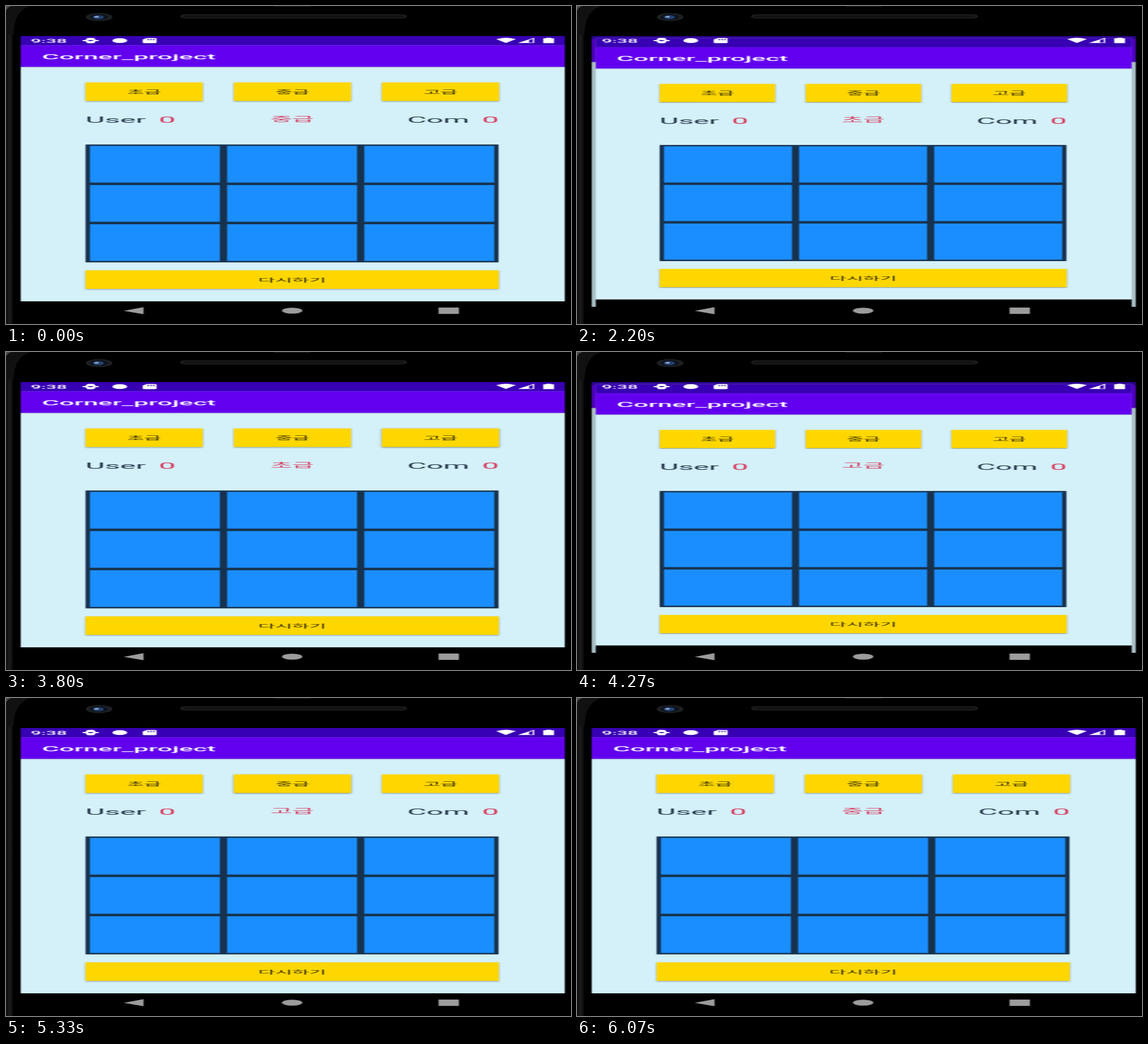
Write an HTML page that moves like this. It is 998 px wide and 561 px high and loops after 6.14 s.

```html
<!DOCTYPE html>
<html lang="ko">
<head>
<meta charset="utf-8">
<title>Board game</title>
<style>
  html, body { margin: 0; width: 100%; height: 100%; overflow: hidden; background: #000; }
  svg { display: block; width: 998px; height: 561px; }
  text { font-family: Roboto, "Noto Sans CJK KR", "Noto Sans CJK", sans-serif; }
  .ko { font-family: "Noto Sans CJK KR", "Noto Sans CJK", sans-serif; }
</style>
</head>
<body>
<svg viewBox="0 0 998 561">
  <defs>
    <linearGradient id="rim">
      <stop offset="0" stop-color="#0c0c0c"/>
      <stop offset=".45" stop-color="#1c1c1c"/>
      <stop offset=".75" stop-color="#121212"/>
      <stop offset="1" stop-color="#020202"/>
    </linearGradient>
    <clipPath id="glass"><rect x="26" y="53" width="961" height="500"/></clipPath>
    <filter id="soft" filterUnits="userSpaceOnUse" x="0" y="40" width="998" height="521" color-interpolation-filters="sRGB">
      <feGaussianBlur stdDeviation=".9 .25"/>
    </filter>
    <filter id="rest" x="-10%" y="-30%" width="120%" height="160%"><feGaussianBlur stdDeviation="2 .8"/></filter>
    <filter id="lift" x="-10%" y="-30%" width="120%" height="160%"><feGaussianBlur stdDeviation="4.5 1"/></filter>
  </defs>

  <!-- phone body -->
  <rect width="998" height="561"/>
  <rect y="30" width="13" height="531" fill="url(#rim)"/>
  <path d="M0 0H44Q14 8 13 50H0Z" fill="#111"/>
  <path d="M0 0H10Q2 2 0 9Z" fill="#4a4a4a"/>
  <rect x="474" y="0" width="64" height="1.5" fill="#161616"/>
  <rect x="307.500" y="14.500" width="401" height="7.500" rx="9" ry="3.700" fill="#1b1b1b"/>
  <rect x="313" y="16.500" width="390" height="3.500" rx="6" ry="1.700" fill="#121212"/>
  <ellipse cx="164.500" cy="19.500" rx="23.500" ry="7" fill="#1c2022"/>
  <ellipse cx="164" cy="19.500" rx="16" ry="5" fill="#0d131c"/>
  <ellipse cx="163" cy="19.800" rx="10" ry="3.500" fill="#23406f"/>
  <ellipse cx="160" cy="19" rx="4" ry="1.500" fill="#8fa6cc"/>

  <g filter="url(#soft)">
    <g clip-path="url(#glass)">
      <g id="back"></g>
      <rect id="dim" x="26" y="53" width="961" height="478" fill="#000" opacity=".2"/>
      <g id="front"></g>
    </g>

    <!-- system bars -->
    <g id="status" fill="#fff"></g>
    <g fill="#fff">
      <ellipse cx="149.500" cy="61" rx="7.500" ry="2.700" fill="none" stroke="#fff" stroke-width="3.400"/>
      <path d="M143 56.500h13v1.500h-13zM143 64h13v1.500h-13zM135.500 60h5v2h-5zM158.500 60h5v2h-5z"/>
      <ellipse cx="201" cy="61" rx="13" ry="4.300"/>
      <path d="M249 56.500H262Q266 56.500 266 57.600V64.400Q266 65.500 262 65.500H245Q241.500 65.500 241.500 64.400V59Z"/>
      <path d="M250 58.200h2.500v2h-2.500zM255 58.200h2.500v2h-2.500zM260 58.200h2.500v2h-2.500z" fill="#3700b3"/>
      <path d="M866 58.500Q883 53.500 900.500 58.500L883 65.200Z"/>
      <path d="M904 65.200L933 56V65.200Z"/>
      <path d="M924 60.200L930.500 58V64.400H924Z" fill="#3700b3"/>
      <path d="M949 57H954V56H963V57H968V65.500H949Z"/>
    </g>
    <g fill="#9c9c9c">
      <path d="M208 537.700L243 531.300V543.800Z"/>
      <ellipse cx="505.500" cy="537.500" rx="18" ry="5.200"/>
      <rect x="764" y="532" width="36" height="11.200"/>
    </g>
  </g>
</svg>

<script>
const LOOP = 6140;
const CENTER = [506.5, 302.5];
const LEVELS = ['초급', '중급', '고급'];
const COLS = [140.5, 402.5, 664];
const EASE = [.4, .9, .96, .985, .995];
const INK = '#24374a', RED = '#d8375a';
const START = 1;

// press: shadow grows on a level button; open: steps of the new page opening
const TAPS = [
  { level: 0, press: [1800], open: [2130, 2200, 2270, 2330, 2400, 2470] },
  { level: 2, press: [3800, 3870, 3930], open: [4200, 4270, 4330, 4400, 4470] },
  { level: 1, press: [5330, 5400, 5470], open: [5730, 5800, 5870, 5930, 6000, 6070] }
];

const $ = id => document.getElementById(id);
const passed = (steps, t) => steps.filter(s => s <= t).length;

const rect = (x, y, w, h, fill, extra = '') =>
  `<rect x="${x}" y="${y}" width="${w}" height="${h}" fill="${fill}" ${extra}/>`;

// text in dp; the whole phone is drawn wide with one common scale
const text = (x, y, size, fill, str, extra = '') =>
  `<text transform="translate(${x} ${y}) scale(2.336 .684)" font-size="${size}" fill="${fill}" ${extra}>${str}</text>`;

const MID = 'class="ko" text-anchor="middle"';
const END = 'text-anchor="end"';

function button(x, y, w, label) {
  return rect(x, y + 1, w, 33, '#000', 'opacity=".3" filter="url(#rest)"') +
    rect(x, y + .5, w, 33, '#000', 'class="lift" opacity="0" filter="url(#lift)"') +
    rect(x, y, w, 32.7, '#ffd700') +
    text(x + w / 2, y + 20.2, 14, '#2b2604', label, MID);
}

function board() {
  let out = rect(140.5, 244.3, 729.5, 208, '#17324d');
  for (let i = 0; i < 9; i++)
    out += rect(148.3 + i % 3 * 242.3, 246.8 + Math.floor(i / 3) * 69.1, 229.5, 64.7, '#1b8eff');
  return out;
}

function page() {
  return rect(26, 53, 961, 468, '#d4f0f9') +
    rect(26, 521, 961, 32, '#000') +
    rect(26, 107, 961, 1.6, '#000', 'opacity=".12"') +
    rect(26, 53, 961, 16.4, '#3700b3') +
    rect(26, 69.2, 961, 38.2, '#6200ee') +
    text(63.4, 93.6, 20, '#fff', 'Corner_project', 'font-weight="500"') +
    COLS.map((x, i) => button(x, 134.8, 207, LEVELS[i])).join('') +
    text(140.5, 206.2, 22.4, INK, 'User') +
    text(270, 206.2, 22.4, RED, '0') +
    text(505.5, 203.6, 17.8, RED, '', MID + ' data-level') +
    text(818.5, 206.2, 22.4, INK, 'Com', END) +
    text(870.5, 206.2, 22.4, RED, '0', END) +
    board() +
    button(140.5, 466.3, 730, '다시하기');
}

function makePage(id) {
  const el = $(id);
  el.innerHTML = page();
  const label = el.querySelector('[data-level]');
  const lifts = [...el.querySelectorAll('.lift')];
  return (level, scale, alpha, pressed, depth) => {
    const [x, y] = CENTER;
    el.setAttribute('transform', `translate(${x} ${y}) scale(${scale}) translate(${-x} ${-y})`);
    el.setAttribute('opacity', alpha);
    if (label.textContent !== LEVELS[level]) label.textContent = LEVELS[level];
    lifts.forEach((l, i) => l.setAttribute('opacity', i === pressed ? depth : 0));
  };
}

const back = makePage('back');
const front = makePage('front');
$('status').innerHTML = text(43.5, 64.7, 14, '#fff', '9:38', 'font-weight="500"');

function render(t) {
  const done = TAPS.filter(tap => tap.open[0] <= t).length;
  const now = TAPS[done - 1], next = TAPS[done];
  const level = now ? now.level : START;
  const count = now ? passed(now.open, t) : 0;
  const p = !now || count === now.open.length ? 1 : EASE[count - 1];
  const moving = p < 1;

  $('back').style.display = $('dim').style.display = moving ? '' : 'none';
  if (moving) {
    const last = done > 1 ? TAPS[done - 2].level : START;
    back(last, 1 + .05 * p, 1, level, .4);
  }
  const depth = next ? .4 * passed(next.press, t) / next.press.length : 0;
  front(level, .85 + .15 * p, count === 1 ? .3 : 1, next ? next.level : -1, depth);
}

function tick() {
  render(performance.now() % LOOP);
  requestAnimationFrame(tick);
}
tick();
</script>
</body>
</html>
```
